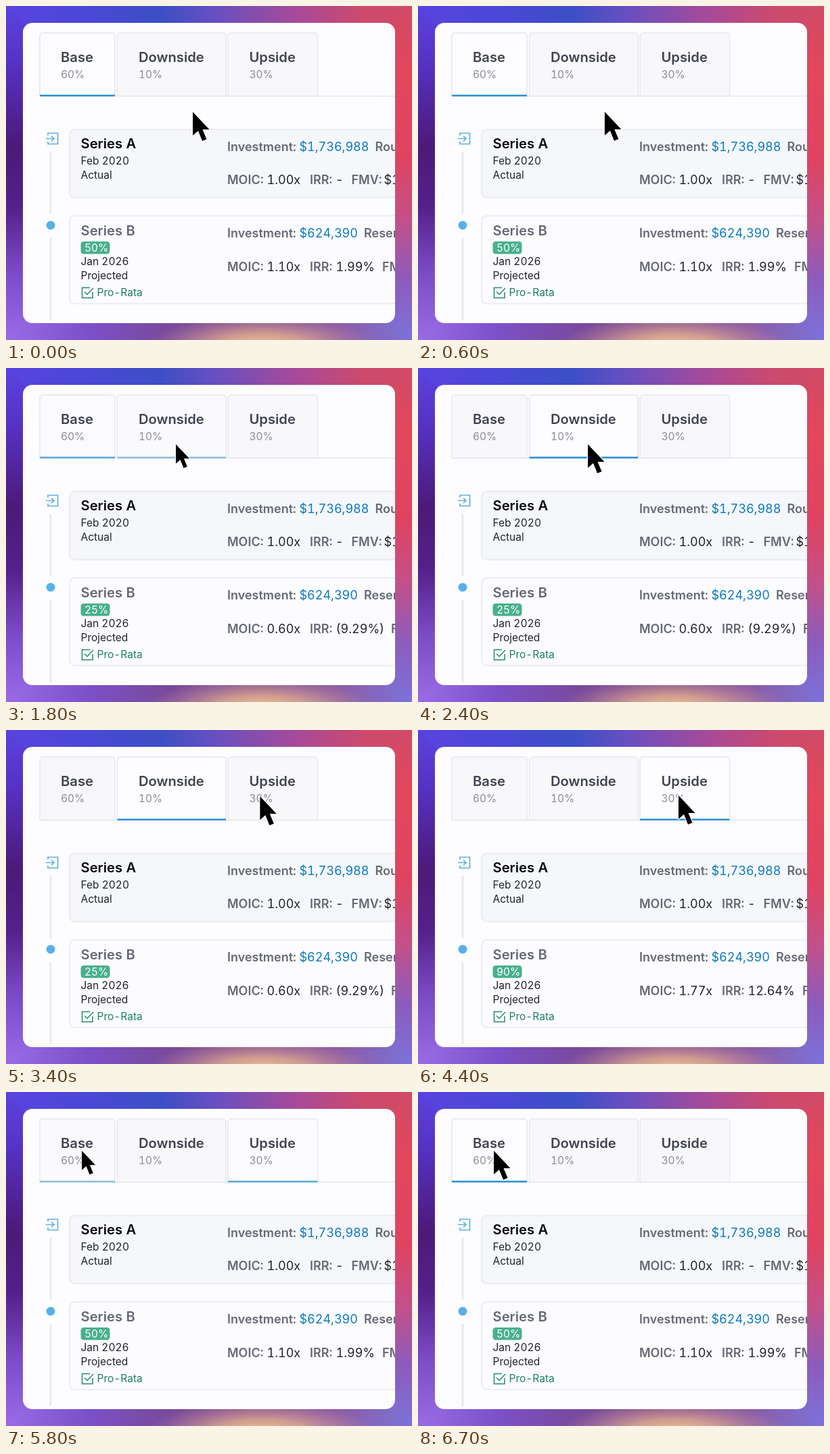
Recreate the animation shown at these times as an HTML page. Size 600x495 px, loop 6.8 s.

```html
<!DOCTYPE html>
<html lang="en">
<head>
<meta charset="utf-8">
<title>Scenario tabs</title>
<style>
html, body { margin: 0; width: 100%; height: 100%; overflow: hidden; }
svg { display: block; width: 600px; height: 495px; font-family: Inter, "Liberation Sans", sans-serif; font-variant-numeric: tabular-nums; }
.title { font-size: 20.2px; font-weight: 600; }
.label { font-size: 18px; font-weight: 600; fill: #666973; }
.value { font-size: 18px; fill: #202329; }
.link { font-size: 18px; fill: #0b79bd; }
.small { font-size: 15.5px; fill: #202329; }
.share { font-size: 15.5px; fill: #8b8d94; }
</style>
</head>
<body>
<svg id="stage" viewBox="0 0 600 495" xmlns="http://www.w3.org/2000/svg">
  <defs id="defs">
    <clipPath id="panelClip"><rect x="25" y="25" width="550" height="445" rx="14"/></clipPath>
    <radialGradient id="glow">
      <stop offset="0" stop-color="#f3c493"/>
      <stop offset=".4" stop-color="#e6b08f" stop-opacity=".75"/>
      <stop offset="1" stop-color="#c888a0" stop-opacity="0"/>
    </radialGradient>
  </defs>
  <g id="backdrop"></g>
  <ellipse cx="378" cy="502" rx="170" ry="42" fill="url(#glow)"/>
  <rect x="25" y="25" width="550" height="445" rx="14" fill="#fdfcfe"/>
  <g clip-path="url(#panelClip)">
    <path d="M50 133.500H580" stroke="#e7e7eb" stroke-width="1.500"/>
    <g id="tabs"></g>
    <g fill="none" stroke="#e6e7eb" stroke-width="2.500">
      <path d="M66 216V308M66 344V466"/>
      <rect x="94" y="183" width="520" height="101" rx="8" fill="#f5f7fa" stroke="#eceef2"/>
      <rect x="94" y="311" width="520" height="130" rx="8" fill="#fcfcfe" stroke="#eeeff3"/>
    </g>
    <path d="M62 192V188.500H76.500V204.500H62V201M59 196.500H71M67 192.500L71 196.500L67 200.500" fill="none" stroke="#5eb0e0" stroke-width="1.700"/>
    <circle cx="66" cy="325" r="6.500" fill="#56b0ea"/>
    <rect x="110.500" y="349" width="43" height="18.500" rx="4.500" fill="#48b08d"/>
    <path d="M128 424V432.500H112.500V417.500H124M116 423.500L120 427.500L129 418" fill="none" stroke="#218a69" stroke-width="1.500"/>
    <g id="copy"></g>
  </g>
  <path id="cursor" d="M0 0V35L8 28L14 43L20.500 40.500L14.500 26H24.500Z" fill="#000" stroke="#fff" stroke-width="2.500" paint-order="stroke" stroke-linejoin="round"/>
</svg>
<script>
const LOOP = 6800;
const byId = id => document.getElementById(id);

function add(parent, name, attrs, text = "") {
  const node = document.createElementNS("http://www.w3.org/2000/svg", name);
  for (const key in attrs) node.setAttribute(key, attrs[key]);
  node.textContent = text;
  parent.append(node);
  return node;
}

const write = (x, y, text, cls, fill) =>
  add(byId("copy"), "text", { x, y, class: cls, ...(fill && { style: `fill:${fill}` }) }, text);

// Each edge of the backdrop has its own colour run; the corners share colours.
function edge(id, points, vertical, stops) {
  const gradient = add(byId("defs"), "linearGradient", {
    id, gradientUnits: "userSpaceOnUse", x1: 0, y1: 0, x2: vertical ? 0 : 600, y2: vertical ? 495 : 0
  });
  stops.forEach(([offset, color]) => add(gradient, "stop", { offset, "stop-color": color }));
  add(byId("backdrop"), "polygon", { points, fill: `url(#${id})`, stroke: `url(#${id})` });
}
edge("left", "0,0 50,50 50,445 0,495", true,
  [[0, "#5a43df"], [.17, "#5632c4"], [.42, "#4c1a78"], [.6, "#55208a"], [.8, "#7c4cc8"], [1, "#9a6be6"]]);
edge("right", "600,0 550,50 550,445 600,495", true,
  [[0, "#d24a66"], [.2, "#e2475c"], [.46, "#de4462"], [.64, "#c45088"], [.82, "#8c5cbc"], [1, "#7c72da"]]);
edge("top", "0,0 50,50 550,50 600,0", false,
  [[0, "#5a43df"], [.2, "#4a48d6"], [.38, "#3c4fc6"], [.52, "#6a4fc0"], [.72, "#a84a98"], [.88, "#cc4a6c"], [1, "#d24a66"]]);
edge("bottom", "0,495 50,445 550,445 600,495", false,
  [[0, "#9a6be6"], [.2, "#7c50c8"], [.4, "#784a9c"], [.6, "#8a5a8c"], [.82, "#8a5ca4"], [1, "#7c72da"]]);

const tabs = [
  { x: 50, w: 111, textX: 81, name: "Base", share: "60%" },
  { x: 164.5, w: 160.5, textX: 196, name: "Downside", share: "10%" },
  { x: 328, w: 132.5, textX: 359.5, name: "Upside", share: "30%" }
].map(({ x, w, textX, name, share }) => {
  const group = byId("tabs");
  const outline = `M${x} 133.5V45Q${x} 40 ${x + 5} 40H${x + w - 5}Q${x + w} 40 ${x + w} 45V133.5`;
  add(group, "path", { d: outline, fill: "#f8f7f9", stroke: "#e9e9ed", "stroke-width": 1.5 });
  add(group, "path", { d: `M${x} 133.5H${x + w}`, stroke: "#e7e7eb", "stroke-width": 1.5 });
  const active = add(group, "g", {});
  add(active, "path", { d: outline, fill: "#fdfcfe", stroke: "#e9e9ed", "stroke-width": 1.5 });
  add(active, "rect", { x, y: 131.5, width: w, height: 2.5, fill: "#2a92cf" });
  add(group, "text", { x: textX, y: 83, class: "title", fill: "#3f444e" }, name);
  add(group, "text", { x: textX, y: 106.5, class: "share" }, share);
  return active;
});

write(110.5, 211, "Series A", "title", "#060708");
write(110.5, 235.2, "Feb 2020", "small");
write(110.5, 255.7, "Actual", "small");
write(110.5, 340, "Series B", "title", "#646873");
write(110.5, 384.3, "Jan 2026", "small");
write(110.5, 404.5, "Projected", "small");
write(134.5, 430, "Pro-Rata", "small", "#1d8062");
write(327, 215, "Investment:", "label");
write(433.5, 215, "$1,736,988", "link");
write(545.5, 215, "Round:", "label");
write(327, 264, "MOIC:", "label");
write(385.5, 264, "1.00x", "value");
write(449, 264, "IRR:", "label");
write(487, 264, "-", "value");
write(510.5, 264, "FMV:", "label");
write(558.5, 264, "$1", "value");
write(327, 343, "Investment:", "label");
write(433.5, 343, "$624,390", "link");
write(529, 343, "Reserves:", "label");
write(327, 392.5, "MOIC:", "label");
write(449, 392.5, "IRR:", "label");
const badge = write(116, 363.8, "", "small", "#fff");
const moic = write(385.5, 392.5, "", "value");
const irr = write(487.5, 392.5, "", "value");
const fmv = write(556, 392.5, "FMV:", "label");

const scenarios = [
  { badge: "50%", moic: "1.10x", irr: "1.99%", fmvX: 556 },
  { badge: "25%", moic: "0.60x", irr: "(9.29%)", fmvX: 569 },
  { badge: "90%", moic: "1.77x", irr: "12.64%", fmvX: 568 }
];

const clicks = [
  { time: 1800, from: 0, to: 1 },
  { time: 3950, from: 1, to: 2 },
  { time: 5800, from: 2, to: 0 }
];
const moves = [
  { start: 500, end: 1450, x: 251, y: 113 },
  { start: 2700, end: 3650, x: 385, y: 97 },
  { start: 4500, end: 5450, x: 112, y: 87 }
];

const progress = (t, a, b) => Math.min(1, Math.max(0, (t - a) / (b - a)));
const ease = p => p < .5 ? 4 * p ** 3 : 1 - 4 * (1 - p) ** 3;

function render(t) {
  let x = 276, y = 157, scale = 1, current = 0;
  for (const move of moves) {
    const p = ease(progress(t, move.start, move.end));
    x += (move.x - x) * p;
    y += (move.y - y) * p;
  }
  const weights = [1, 0, 0];
  for (const { time, from, to } of clicks) {
    const p = progress(t, time - 100, time + 100);
    if (p > 0) {
      weights[from] = 1 - p * p;
      weights[to] = p;
    }
    if (t >= time - 50) current = to;
    scale -= .18 * Math.max(0, 1 - Math.abs(t - time) / 180);
  }
  tabs.forEach((tab, i) => tab.setAttribute("opacity", weights[i]));
  const data = scenarios[current];
  badge.textContent = data.badge;
  moic.textContent = data.moic;
  irr.textContent = data.irr;
  fmv.setAttribute("x", data.fmvX);
  byId("cursor").setAttribute("transform", `translate(${x} ${y}) scale(${scale})`);
}

const origin = performance.now();
function tick() {
  render((performance.now() - origin) % LOOP);
  requestAnimationFrame(tick);
}
tick();
</script>
</body>
</html>
```
